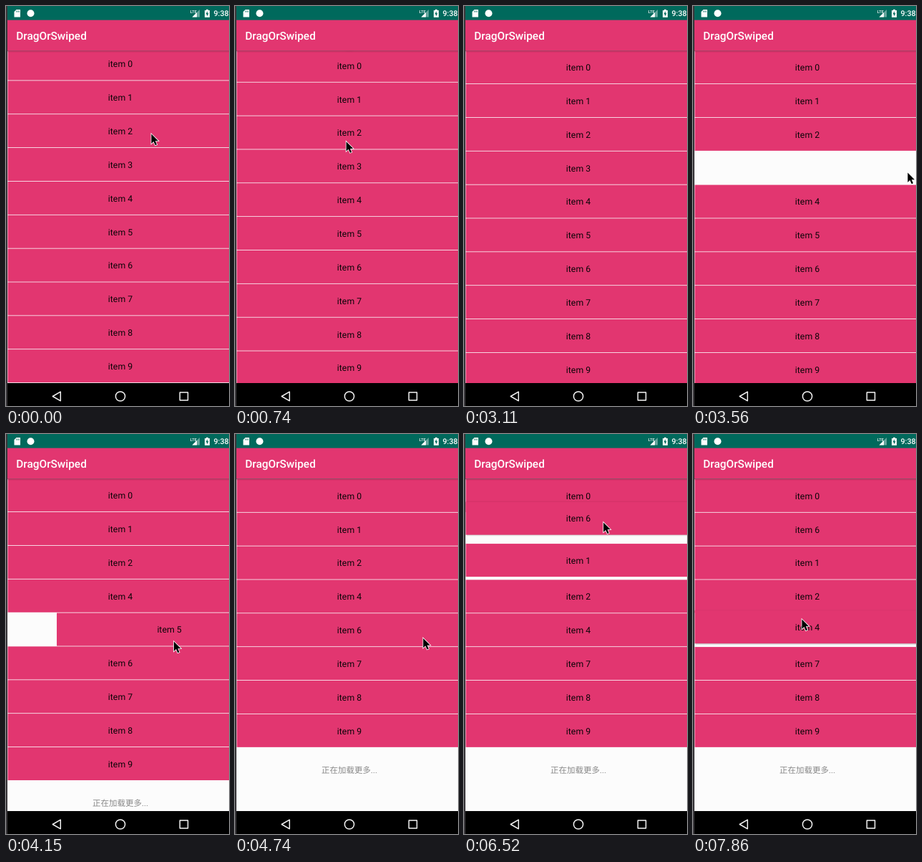
Recreate the animation shown at these times as an HTML page with a canvas. Size 312 by 558 pixels, loop 8 s.

```html
<!DOCTYPE html>
<html lang="en">
<head>
<meta charset="utf-8">
<title>DragOrSwiped</title>
<style>
html, body { margin: 0; width: 100%; height: 100%; overflow: hidden; background: #000; }
canvas { display: block; width: 312px; height: 558px; }
</style>
</head>
<body>
<canvas id="stage"></canvas>
<script>
const W = 312, H = 558, LOOP = 8000, STEPS = 54;
const PINK = '#e23670', TEAL = '#00695c', PAPER = '#fcfcfc', WHITE = '#fff';
const TOP = 62.85, PITCH = 46.85, ROW_H = 46.05, BAR_TOP = 19.6, BAR_BOTTOM = 62.4, NAV_TOP = 526;
const MID = 160, ROW_W = 318;

const canvas = document.getElementById('stage');
const ctx = canvas.getContext('2d');
const ratio = window.devicePixelRatio || 1;
canvas.width = W * ratio;
canvas.height = H * ratio;

// Eased progress from 0 to 1 between two steps.
function ramp(n, from, to) {
  const t = Math.min(1, Math.max(0, (n - from) / (to - from)));
  return t * t * (3 - 2 * t);
}

const refresh = { pull: 4, release: 9, finish: 15 };
const swipes = { 3: 21, 5: 27 };
const drags = { 6: { from: 38, drop: 45, slots: -3 }, 4: { from: 52, drop: STEPS, slots: 0 } };
const displaced = [4, 2, 1];
const SWIPE_TIME = 3.35, DRAG_GAIN = 1.03;

const pointerStart = { x: 203, y: 178 };
const pointerMoves = [
  { from: 1, to: 3, x: 155, y: 180 },
  { from: 4, to: 10, x: 158, y: 296 },
  { from: 10, to: 17, x: 131, y: 228 },
  { from: 21, to: 24, x: 300, y: 232 },
  { from: 24, to: 26, x: 167, y: 288 },
  { from: 27, to: 29, x: 302, y: 290 },
  { from: 30, to: 35, x: 191, y: 274 },
  { from: 38, to: 45, x: 195, y: 114 },
  { from: 45, to: 50, x: 152, y: 262 },
  { from: 52, to: 53, x: 152, y: 258 }
];

function pointerAt(n) {
  return pointerMoves.reduce((p, move) => {
    const k = ramp(n, move.from, move.to);
    return { x: p.x + (move.x - p.x) * k, y: p.y + (move.y - p.y) * k };
  }, pointerStart);
}

const scrollAt = n => -5.4 + 4.7 * ramp(n, refresh.pull, refresh.pull + 2) + 0.7 * ramp(n, 30, 32);
const swipeAt = (item, n) => item in swipes ? 320 * ramp(n, swipes[item], swipes[item] + SWIPE_TIME) : 0;
const closedAt = (item, n) => ramp(n, swipes[item] + 3, swipes[item] + 5);
const isLifted = (item, n) => item in drags && n >= drags[item].from && n <= drags[item].drop;

function dragAt(item, n) {
  if (!(item in drags)) return 0;
  const { from, drop, slots } = drags[item];
  const pulled = pointerAt(Math.min(n, drop)).y - pointerAt(from).y;
  const offset = n < from ? 0 : pulled * DRAG_GAIN / PITCH;
  return offset + (slots - offset) * ramp(n, drop, drop + 1);
}

function slotOf(item, n) {
  let slot = item + dragAt(item, n);
  for (const gone in swipes) if (item > gone) slot -= closedAt(gone, n);
  const order = displaced.indexOf(item);
  if (order >= 0) slot += ramp(n, 40 + order * 1.5, 41.2 + order * 1.5);
  return slot;
}

function box(color, x, y, w, h) {
  ctx.fillStyle = color;
  ctx.fillRect(x, y, w, h);
}

function label(text, x, y, font, color, align = 'center') {
  ctx.save();
  // A trace of skew keeps baselines from snapping to whole pixels.
  ctx.transform(1, 1e-4, 0, 1, 0, 0);
  ctx.font = font;
  ctx.textRendering = 'geometricPrecision';
  ctx.fillStyle = color;
  ctx.textAlign = align;
  ctx.fillText(text, x, y);
  ctx.restore();
}

function polygon(points) {
  ctx.beginPath();
  points.forEach(([x, y]) => ctx.lineTo(x, y));
  ctx.closePath();
}

function fillPolygon(color, points) {
  polygon(points);
  ctx.fillStyle = color;
  ctx.fill();
}

function disc(x, y, r, color) {
  ctx.beginPath();
  ctx.arc(x, y, r, 0, Math.PI * 2);
  ctx.fillStyle = color;
  ctx.fill();
}

function shadow(blur, alpha, dy) {
  ctx.shadowColor = `rgba(0,0,0,${alpha})`;
  ctx.shadowBlur = blur * ratio;
  ctx.shadowOffsetY = dy * ratio;
}

function drawRow(item, n) {
  const y = TOP + scrollAt(n) + slotOf(item, n) * PITCH;
  const dx = swipeAt(item, n);
  ctx.save();
  if (isLifted(item, n)) shadow(2, 0.3, 0.7);
  box(PINK, 2.5 + dx, y, ROW_W, ROW_H);
  ctx.restore();
  label('item ' + item, MID + dx, y + 27.9, '12.3px Roboto, sans-serif', '#0c0508');
}

function drawList(n) {
  ctx.save();
  ctx.beginPath();
  ctx.rect(2, BAR_BOTTOM, W - 2, NAV_TOP - BAR_BOTTOM);
  ctx.clip();
  box(PAPER, 2, BAR_BOTTOM, W, NAV_TOP - BAR_BOTTOM);
  const items = Array.from({ length: 10 }, (_, i) => i);
  items.sort((a, b) => isLifted(a, n) - isLifted(b, n));
  items.forEach(item => drawRow(item, n));
  const end = TOP + scrollAt(n) + slotOf(10, n) * PITCH;
  label('正在加载更多...', MID, end + 35.5, '11.5px Roboto, "Noto Sans CJK SC", "Noto Sans CJK", sans-serif', '#888');
  drawSpinner(n);
  ctx.restore();
}

function drawSpinner(n) {
  const { pull, release, finish } = refresh;
  const scale = 1 - ramp(n, finish, finish + 2);
  if (n <= pull || scale === 0) return;
  const turn = (n - release - 1) * 0.9;
  ctx.save();
  ctx.translate(MID, 46 + 55 * ramp(n, pull + 1, release) - 4.7 * ramp(n, release, release + 1));
  ctx.scale(scale, scale);
  ctx.save();
  shadow(2.5, 0.25, 0.8);
  disc(0, 0, 15.2, '#fafafa');
  ctx.restore();
  ctx.beginPath();
  ctx.arc(0, 0.3, 7, turn - 0.1, turn + 3.2 + Math.sin(turn));
  ctx.lineWidth = 1.9;
  ctx.strokeStyle = '#35b6d9';
  ctx.stroke();
  ctx.restore();
}

function drawBars() {
  box(TEAL, 2, 0, W, 20);
  box(PINK, 2, BAR_TOP, W, BAR_BOTTOM - BAR_TOP);
  const fade = ctx.createLinearGradient(0, BAR_BOTTOM, 0, BAR_BOTTOM + 3);
  fade.addColorStop(0, 'rgba(0,0,0,.17)');
  fade.addColorStop(1, 'rgba(0,0,0,0)');
  box(fade, 2, BAR_BOTTOM, W, 3);
  label('DragOrSwiped', 14.2, 47, '500 15.4px Roboto, sans-serif', WHITE, 'left');
  drawStatus();
  drawNavigation();
}

function drawStatus() {
  fillPolygon(WHITE, [[14.5, 5], [20, 5], [20, 15.5], [11.5, 15.5], [11.5, 8]]);
  for (let x = 14.2; x < 18; x += 1.8) box(TEAL, x, 6.5, 0.8, 2.2);
  disc(34.5, 10.2, 5, WHITE);

  label('LTE', 257.8, 9.6, '500 5.6px Roboto, sans-serif', WHITE, 'left');
  fillPolygon('rgba(255,255,255,.4)', [[271, 5], [271, 15.5], [260.5, 15.5]]);
  fillPolygon(WHITE, [[267, 9], [267, 15.5], [260.5, 15.5]]);

  box(WHITE, 278, 6, 7, 9.8);
  box(WHITE, 280, 4.8, 3, 1.3);
  fillPolygon(TEAL, [[282, 7.2], [279.4, 11.6], [281.1, 11.6], [281, 14.6], [283.6, 10.2], [282, 10.2]]);
  label('9:38', 290.5, 14.2, '500 10.75px Roboto, sans-serif', WHITE, 'left');
}

function drawNavigation() {
  box('#000', 2, NAV_TOP, W, H - NAV_TOP);
  ctx.strokeStyle = '#f4f4f4';
  ctx.lineWidth = 1.5;
  ctx.lineJoin = 'round';
  polygon([[65.3, 544.5], [76.3, 538.2], [76.3, 550.8]]);
  ctx.stroke();
  ctx.beginPath();
  ctx.arc(MID, 544.5, 6.6, 0, Math.PI * 2);
  ctx.stroke();
  ctx.strokeRect(243.3, 539, 11.2, 11);
}

function drawPointer(n) {
  if (n === swipes[3]) return;
  const { x, y } = pointerAt(n);
  ctx.save();
  ctx.translate(x + 0.4, y + 0.6);
  ctx.scale(0.92, 0.92);
  polygon([[0, 0], [0, 14.5], [3.4, 11.4], [5.9, 17], [8.3, 16], [5.9, 10.6], [10.5, 10.4]]);
  ctx.lineWidth = 1.7;
  ctx.lineJoin = 'miter';
  ctx.strokeStyle = WHITE;
  ctx.stroke();
  ctx.fillStyle = '#000';
  ctx.fill();
  ctx.restore();
}

function render(now) {
  // The screen updates in even steps, like a low-rate capture.
  const n = Math.floor((now + 3) % LOOP / LOOP * STEPS);
  ctx.setTransform(ratio, 0, 0, ratio, 0, 0);
  box('#39373b', 0, 0, W, H);
  drawList(n);
  drawBars();
  drawPointer(n);
}

let began;
function loop(now) {
  began ??= now;
  render(now - began);
  requestAnimationFrame(loop);
}
render(0);
requestAnimationFrame(loop);
</script>
</body>
</html>
```
